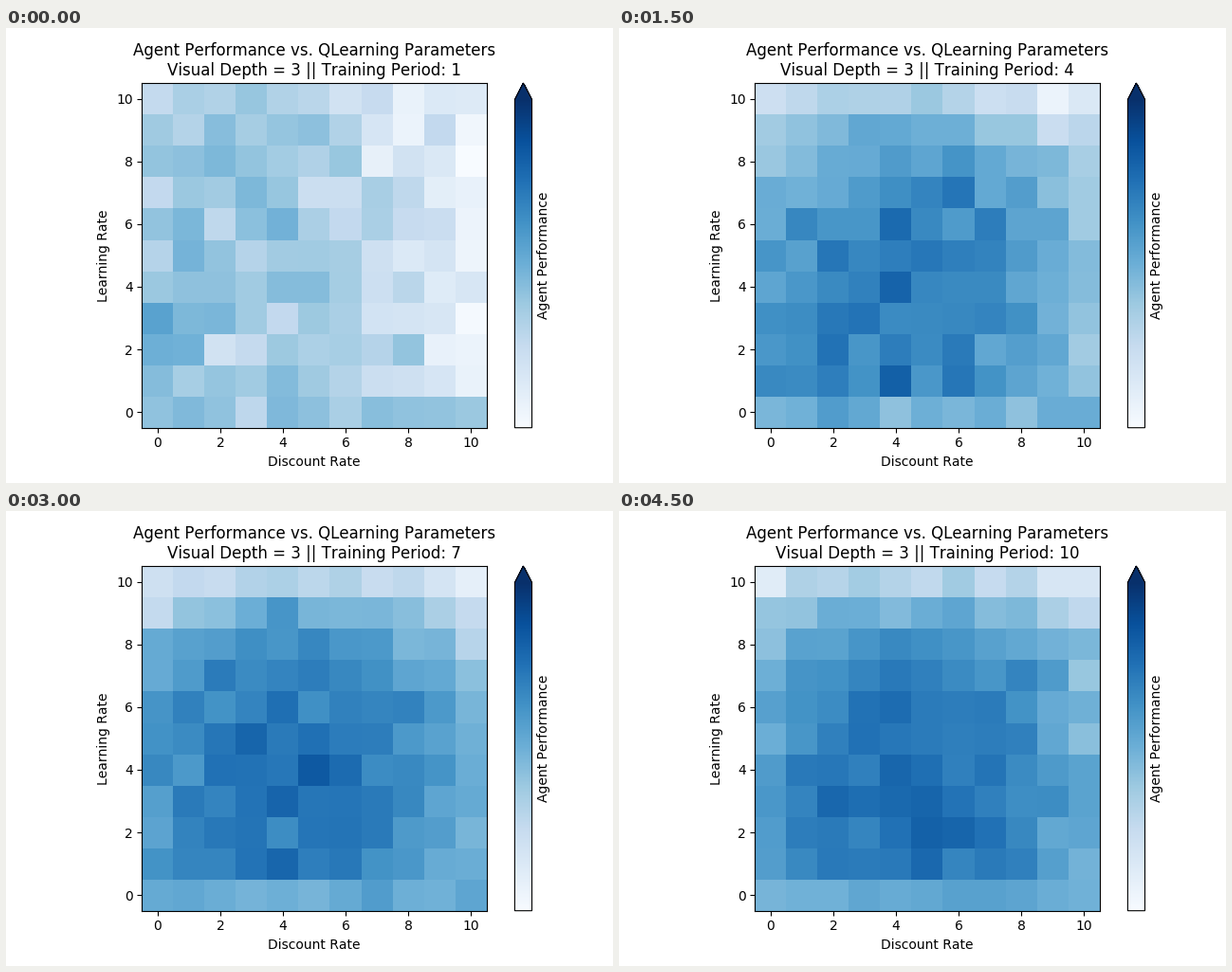
Write a matplotlib script that moves like this. It is 640 px wide and 480 px high and loops after 5 s.

```python
import math

import numpy as np
import matplotlib.pyplot as plt
from matplotlib.animation import FuncAnimation

W, H, DPI = 640, 480, 100
N, PERIODS = 11, 10

plt.rcParams["font.family"] = "DejaVu Sans"
plt.rcParams["text.kerning_factor"] = 6


def performance(period):
    """Scores by learning rate (rows) and discount rate (columns)."""
    growth = math.sin(math.log10(period) * math.pi / 2)
    learn, discount = np.mgrid[0:1:N * 1j, 0:1:N * 1j]

    # A ridge that rises with training and drops off at the extremes
    peak = 0.41 + 0.36 * growth
    center = 0.2 + 0.25 * growth
    side_drop = (0.5 + 0.3 * growth) * (discount - center) ** 2
    top_drop = (0.08 + 0.36 * growth) * learn ** 5
    mean = peak - side_drop - top_drop
    # Without learning the agent barely improves
    mean[0] = 0.38 + 0.14 * growth

    spread = 0.04 + 0.04 / period
    noise = np.random.default_rng(period).normal(0, spread, (N, N))
    return np.clip(mean + noise, 0, 0.84)


def box(left, top, right, bottom):
    return [left / W, 1 - bottom / H, (right - left) / W, (bottom - top) / H]


fig = plt.figure(figsize=(W / DPI, H / DPI), dpi=DPI, facecolor="white")
ax = fig.add_axes(box(143.3, 58, 507, 421.7))
cax = fig.add_axes(box(536.4, 58, 554.5, 421.7))

heat = ax.imshow(performance(1), cmap="Blues", vmin=0, vmax=1, origin="lower",
                 aspect="auto", interpolation="nearest")
ax.set_xticks(range(0, N, 2))
ax.set_yticks(range(0, N, 2))
ax.set_xlabel("Discount Rate")
ax.set_ylabel("Learning Rate")
title = ax.set_title("")

bar = fig.colorbar(heat, cax=cax, extend="max", ticks=[])
bar.set_label("Agent Performance", y=0.525)


def update(frame):
    period = frame + 1
    heat.set_data(performance(period))
    title.set_text("Agent Performance vs. QLearning Parameters\n"
                   f"Visual Depth = 3 || Training Period: {period}")
    return heat, title


update(0)
anim = FuncAnimation(fig, update, frames=PERIODS, interval=500,
                     repeat=True, repeat_delay=0, blit=False)
plt.show()
```
